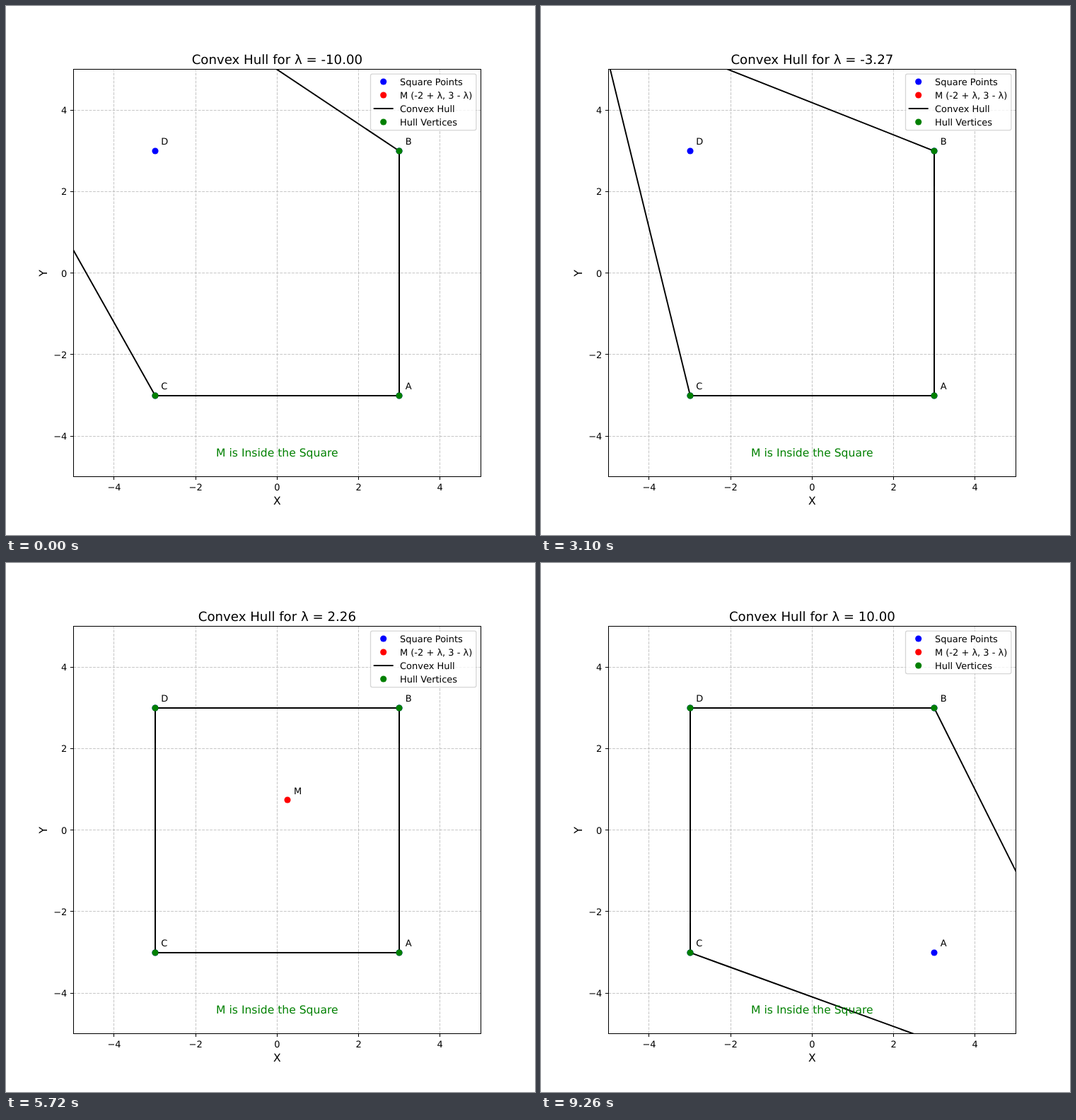
These frames come from a looping animation (748 px wide and 748 px high, 9280 ms). An HTML page:

```html
<!DOCTYPE html>
<html lang="en">
<head>
<meta charset="utf-8">
<title>Convex Hull</title>
<style>
  html, body { margin: 0; width: 100%; height: 100%; overflow: hidden; background: #fff; }
  svg { display: block; width: 748px; height: 748px; }
  text { font-family: "DejaVu Sans", sans-serif; font-size: 12.986px; text-rendering: geometricPrecision; }
</style>
</head>
<body>
<svg id="stage" viewBox="0 0 748 748"></svg>
<script>
const PT = 748 / 8 / 72;
const CX = 383.35, CY = 377.74, UNIT = 57.596;
const STEPS = 200, LOOP = 9280;
const CORNERS = { A: [3, -3], B: [3, 3], C: [-3, -3], D: [-3, 3] };

const px = x => CX + x * UNIT;
const py = y => CY - y * UNIT;
const crisp = v => Math.floor(v) + 0.5;
const LEFT = crisp(px(-5)), RIGHT = crisp(px(5)), TOP = crisp(py(5)), BOTTOM = crisp(py(-5));

function add(parent, name, attrs = {}, content = '') {
  const el = document.createElementNS('http://www.w3.org/2000/svg', name);
  set(el, attrs);
  el.textContent = content;
  parent.appendChild(el);
  return el;
}
function set(el, attrs) {
  for (const key in attrs) el.setAttribute(key, attrs[key]);
}
const label = (parent, content, x, y, anchor = 'start', points = 10) =>
  add(parent, 'text', { x, y, 'text-anchor': anchor, style: `font-size:${points * PT}px` }, content);
const dot = (parent, fill, cx = 0, cy = 0) => add(parent, 'circle', { cx, cy, r: 3.5 * PT, fill });
const place = (circle, [x, y]) => set(circle, { cx: Math.round(px(x)), cy: Math.round(py(y)) });
const show = (el, visible) => set(el, { visibility: visible ? 'visible' : 'hidden' });

const stage = document.getElementById('stage');
const frame = { x: LEFT, y: TOP, width: RIGHT - LEFT, height: BOTTOM - TOP };
add(add(stage, 'clipPath', { id: 'axes' }), 'rect', frame);

// Grid, ticks and tick labels
const grid = add(stage, 'g', {
  stroke: '#b0b0b0', 'stroke-opacity': 0.7, 'stroke-width': 0.8 * PT,
  'stroke-dasharray': `${2.96 * PT} ${1.28 * PT}`
});
const ticks = add(stage, 'g', { stroke: '#000', 'stroke-width': 0.8 * PT });
for (let v = -4; v <= 4; v += 2) {
  const x = crisp(px(v)), y = crisp(py(v));
  const name = String(v).replace('-', '\u2212');
  add(grid, 'path', { d: `M${x} ${BOTTOM}V${TOP}M${LEFT} ${y}H${RIGHT}` });
  add(ticks, 'path', { d: `M${x} ${BOTTOM}v${3.5 * PT}M${LEFT} ${y}h${-3.5 * PT}` });
  label(stage, name, px(v), 684.9, 'middle');
  label(stage, name, 86.3, py(v) + 4.8, 'end');
}

// Plot
const plot = add(stage, 'g', { 'clip-path': 'url(#axes)' });
const bluePoints = add(plot, 'g');
for (const name in CORNERS) place(dot(bluePoints, '#00f'), CORNERS[name]);
const redPoint = dot(plot, '#f00');
const hullLine = add(plot, 'path', {
  fill: 'none', stroke: '#000', 'stroke-width': 1.5 * PT, 'stroke-linecap': 'square'
});
const greenPoints = {};
for (const name of 'ABCDM') {
  greenPoints[name] = dot(plot, '#008000');
  if (name !== 'M') place(greenPoints[name], CORNERS[name]);
}
add(stage, 'rect', { ...frame, fill: 'none', stroke: '#000', 'stroke-width': 0.8 * PT });

// Text
const nameAt = ([x, y]) => ({ x: px(x + 0.15), y: py(y + 0.15) });
for (const name in CORNERS) {
  const at = nameAt(CORNERS[name]);
  label(stage, name, at.x, at.y);
}
const movingName = label(stage, 'M', 0, 0);
const title = label(stage, '', CX, 82, 'middle', 14);
const status = label(stage, '', CX, py(-4.5), 'middle', 12);
label(stage, 'X', CX, 705.1, 'middle', 12);
set(label(stage, 'Y', 0, 0, 'middle', 12), { transform: `translate(58.2 ${CY}) rotate(-90)` });

// Legend
const legend = add(stage, 'g');
const legendBox = add(legend, 'rect', {
  x: 515.5, y: 96.2, width: 149.4, rx: 2.6,
  fill: '#fff', stroke: '#ccc', 'stroke-width': PT, opacity: 0.8
});
function legendRow(row, content, color) {
  const g = add(legend, 'g');
  const y = 107 + 19 * row;
  if (color) dot(g, color, 533.7, y);
  else add(g, 'path', { d: `M520.7 ${y}h26`, stroke: '#000', 'stroke-width': 1.5 * PT, 'stroke-linecap': 'square' });
  label(g, content, 557, y + 4.6);
  return g;
}
legendRow(0, 'Square Points', '#00f');
legendRow(1, 'M (-2 + λ, 3 - λ)', '#f00');
const lineRow = legendRow(2, 'Convex Hull');
const vertexRow = legendRow(3, 'Hull Vertices', '#008000');

// Steps come in threes lasting 20, 100 and 20 ms
function stepAt(time) {
  const rest = time % 140;
  return 3 * Math.floor(time / 140) + (rest < 20 ? 0 : rest < 120 ? 1 : 2);
}

function hullOrder(lambda) {
  if (lambda < -1) return 'ABMC';
  if (lambda < 0) return 'ABMDC';
  if (lambda < 5) return 'ABDC';
  if (lambda < 6) return 'AMBDC';
  return 'MBDC';
}

function draw(step) {
  const lambda = -10 + 20 * step / (STEPS - 1);
  const moving = [lambda - 2, 3 - lambda];
  const points = { ...CORNERS, M: moving };
  const hull = hullOrder(lambda);
  const outside = hull.length === 5;
  const hasA = hull.includes('A');

  const vertex = name => {
    const [x, y] = points[name];
    return name === 'M' ? `${px(x)} ${py(y)}` : `${Math.round(px(x))} ${Math.round(py(y))}`;
  };
  set(hullLine, {
    d: [...hull].map((name, i) => `M${vertex(name)}L${vertex(hull[(i + 1) % hull.length])}`).join('')
  });
  place(redPoint, moving);
  place(greenPoints.M, moving);
  for (const name in greenPoints) show(greenPoints[name], hull.includes(name));

  set(movingName, nameAt(moving));
  show(movingName, moving.every(v => Math.abs(v + 0.15) <= 5));

  title.textContent = `Convex Hull for λ = ${lambda.toFixed(2)}`;
  status.textContent = `M is ${outside ? 'Outside' : 'Inside'} the Square`;
  set(status, { fill: outside ? '#f00' : '#008000' });

  show(lineRow, hasA);
  set(vertexRow, { transform: `translate(0 ${hasA ? 0 : -19})` });
  set(legendBox, { height: hasA ? 79.4 : 60.4 });
}

const start = performance.now();
let shown = -1;
function tick() {
  const step = stepAt((performance.now() - start) % LOOP);
  if (step !== shown) draw(shown = step);
  requestAnimationFrame(tick);
}
tick();
</script>
</body>
</html>
```
